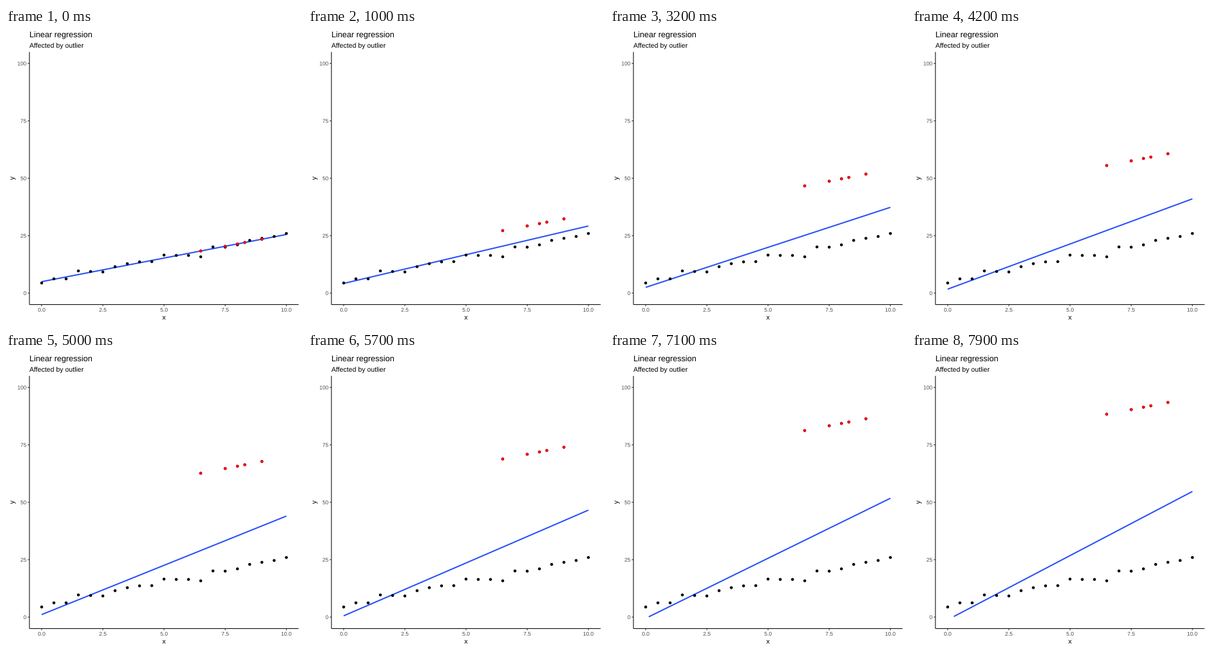
A matplotlib script that plays this animation: 480x480 px, repeating every 8000 ms.

```python
import numpy as np
import matplotlib.pyplot as plt
from matplotlib.animation import FuncAnimation
from matplotlib.patches import PathPatch
from matplotlib.textpath import TextPath
from matplotlib.transforms import Affine2D

SIZE = 480
DPI = 96
PX = 72 / DPI  # points per pixel
FRAMES = 80
RISE = 70
BLUE, RED, GREY = "#2750fb", "#fb0207", "#4d4d4d"
LEFT, RIGHT, TOP, BOTTOM = 38.0, 474.5, 38.8, 448.5

plt.rcParams["font.family"] = "Liberation Sans"

base_x = np.arange(21) / 2
base_y = np.array([4.4, 6.2, 6.2, 9.65, 9.4, 9.2, 11.5, 12.8, 13.6, 13.7, 16.55,
                   16.4, 16.4, 15.8, 20.1, 20.0, 21.0, 22.95, 23.85, 24.65, 25.95])
out_x = np.array([6.5, 7.5, 8, 8.3, 9])
out_y = 5 + 2.05 * out_x
grid = np.linspace(0, 10, 80)

fig = plt.figure(figsize=(SIZE / DPI, SIZE / DPI), dpi=DPI, facecolor="white")
ax = fig.add_axes([LEFT / SIZE, 1 - BOTTOM / SIZE,
                   (RIGHT - LEFT) / SIZE, (BOTTOM - TOP) / SIZE])
ax.set(xlim=(-0.5, 10.5), ylim=(-5, 105))
ax.axis("off")


def px_x(x):
    return LEFT + (x + 0.5) / 11 * (RIGHT - LEFT)


def px_y(y):
    return BOTTOM - (y + 5) / 110 * (BOTTOM - TOP)


def rule(xs, ys, color="black"):
    """Draw an axis line or tick between pixel positions, without snapping."""
    line = plt.Line2D(xs, SIZE - np.array(ys), color=color, lw=1.07 * PX,
                      solid_capstyle="butt", transform=Affine2D(), snap=False)
    fig.add_artist(line)


def label(x, y, text, size, color="black", align=0.5, angle=0):
    """Draw text as outlines on a pixel baseline; align 0 is left, 1 is right."""
    path = TextPath((0, 0), text, size=size)
    box = path.get_extents()
    shift = 0 if align == 0 else -(box.x0 + align * box.width)
    place = Affine2D().translate(shift, 0).rotate_deg(angle).translate(x, SIZE - y)
    fig.add_artist(PathPatch(path, facecolor=color, lw=0, transform=place, snap=False))


label(LEFT, 15, "Linear regression", 13.2, align=0)
label(LEFT, 32, "Affected by outlier", 11, align=0)
label(px_x(5), 472.8, "x", 11)
label(13.3, px_y(50), "y", 11, angle=90)
for tick in np.arange(0, 11, 2.5):
    rule([px_x(tick)] * 2, [BOTTOM, BOTTOM + 2.75], "#333333")
    label(px_x(tick), 460, f"{tick:.1f}", 8.8, GREY)
for tick in np.arange(0, 101, 25):
    rule([LEFT - 2.75, LEFT], [px_y(tick)] * 2, "#333333")
    label(32.8, px_y(tick) + 3.2, f"{tick:.0f}", 8.8, GREY, align=1)
rule([LEFT, LEFT], [TOP, BOTTOM])
rule([LEFT, RIGHT], [BOTTOM, BOTTOM])

fit_line, = ax.plot([], [], color=BLUE, lw=2.1 * PX, solid_capstyle="butt", zorder=2)
all_x = np.concatenate([base_x, out_x])
dot_x = np.append(all_x, out_x)
colors = ["black"] * len(all_x) + [RED] * len(out_x)
dots = ax.scatter(dot_x, np.zeros(len(dot_x)), c=colors,
                  s=(4.7 * PX) ** 2, linewidths=0, zorder=3)


def update(frame):
    lifted = out_y + RISE * frame / (FRAMES - 1)
    all_y = np.concatenate([base_y, lifted])
    fit = np.polyval(np.polyfit(all_x, all_y, 1), grid)
    shown = fit >= 0
    fit_line.set_data(grid[shown], fit[shown])
    dots.set_offsets(np.column_stack([dot_x, np.append(all_y, lifted)]))
    return fit_line, dots


anim = FuncAnimation(fig, update, frames=FRAMES, interval=100,
                     repeat=True, repeat_delay=0)
plt.show()
```
